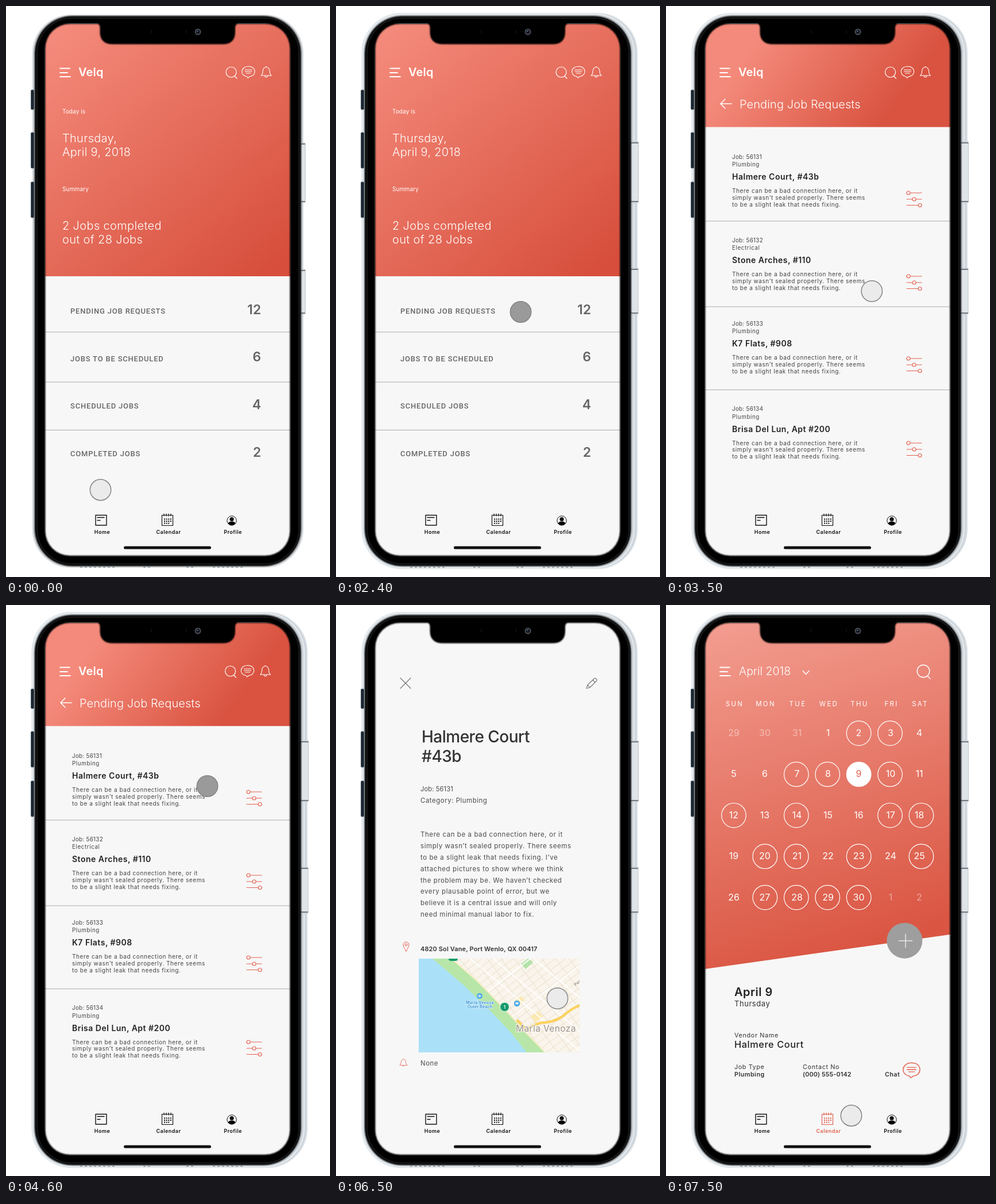
Animation of 564x993 px, one loop 9.5 s. Source, as an HTML page:

```html
<!DOCTYPE html>
<html lang="en">
<head>
<meta charset="utf-8">
<title>Job manager walkthrough</title>
<style>
  html, body { margin: 0; width: 100%; height: 100%; overflow: hidden; background: #fff; }
  svg { display: block; }
  #stage { width: 100%; height: 100%; font-family: Inter, sans-serif; }
  .caps { font-family: Roboto, sans-serif; font-weight: 500; }
  .light { font-weight: 300; }
  .medium { font-weight: 500; }
  .bold { font-weight: 600; }
  .mid { text-anchor: middle; }
  .line { fill: none; stroke: currentColor; stroke-linecap: round; stroke-linejoin: round; }
  .page { display: none; }
</style>
</head>
<body>
<svg id="stage" viewBox="0 0 564 993"></svg>
<script>
const LOOP = 9500;
const BRAND = 'Velq', SITE = 'Halmere Court', TOWN = 'Marla Venoza';

const text = (x, y, size, str, spacing = 0, cls = '', fill = 'currentColor', extra = '') =>
  `<text x="${x}" y="${y}" font-size="${size}" letter-spacing="${spacing}" class="${cls}" fill="${fill}" ${extra}>${str}</text>`;
const path = (d, width = 1.2, extra = '') => `<path class="line" d="${d}" stroke-width="${width}" ${extra}/>`;
const at = (x, y, body, color = 'inherit', scale = 1) =>
  `<g transform="translate(${x} ${y}) scale(${scale})" style="color:${color}">${body}</g>`;
const rect = (x, y, w, h, fill, r = 0, extra = '') =>
  `<rect x="${x}" y="${y}" width="${w}" height="${h}" rx="${r}" fill="${fill}" ${extra}/>`;
const circle = (x, y, r, fill = 'none', extra = '') =>
  `<circle cx="${x}" cy="${y}" r="${r}" fill="${fill}" ${extra}/>`;
const gradient = (id, x1, y1, x2, y2, from, to) =>
  `<linearGradient id="${id}" gradientUnits="userSpaceOnUse" x1="${x1}" y1="${y1}" x2="${x2}" y2="${y2}">
    <stop stop-color="${from}"/><stop offset="1" stop-color="${to}"/></linearGradient>`;
const roundBox = (x, y, w, h, r) => `M${x + r} ${y}h${w - 2 * r}a${r} ${r} 0 0 1 ${r} ${r}v${h - 2 * r}a${r} ${r} 0 0 1 ${-r} ${r}` +
  `h${2 * r - w}a${r} ${r} 0 0 1 ${-r} ${-r}v${2 * r - h}a${r} ${r} 0 0 1 ${r} ${-r}z`;
const rule = y => rect(68, y, 427, 1, '#acacac');

// Icons, each centred on its own zero point
const menu = path('M94 108.5h17M94 116h13M94 123h18', 1.8);
const search = path('M9 0a9 9 0 1 1-18 0a9 9 0 1 1 18 0M6 7l4 4');
const chat = path('M-3 8.5C-15 7-14-9 0-9C15-9 14 8 2 8.7L-1 11zM-6-3H6M-6 0H6M-4 3H4', 1.1);
const bell = path('M-9 6Q-6 4-6-2Q-5-8-1-8.5Q0-11 1-8.5Q5-8 6-2Q6 4 9 6zM-2.5 7Q0 11 2.5 7', 1.1);
const pin = path('M0 8Q-5 0-5-3A5 5 0 0 1 5-3Q5 0 0 8zM2-3a2 2 0 1 1-4 0a2 2 0 1 1 4 0', 1);
const pencil = path('M-9 9L-7 3L4.500-8Q6-9.500 8-7.500Q10-5.500 8.500-4L-3 7.500zM-7 3L-3 7.500M2-5.500L6-1.500', 1.1);
const sliders = [[-10, -11], [0, 0], [10, 10.5]].map(([knob, y]) =>
  path(`M-13 ${y}H13`, 1.1) + circle(knob, y, 3, '#f7f7f7', 'stroke="currentColor" stroke-width="1.1"')).join('');
const topIcons = dx => at(392 + dx, 115, search) + at(422 + dx, 114, chat) + at(453 + dx, 115, bell);
const appBar = dx => menu + text(126, 122, 20, BRAND, .2, 'bold') + topIcons(dx);

function nav(calendarColor = '#111') {
  let dots = '';
  for (let i = 0; i < 11; i++) dots += rect(-6 + i % 4 * 3.6, -2.6 + Math.floor(i / 4) * 3.6, 2, 2, 'currentColor');
  const calendar = path('M-9.5-8.5h19v18h-19zM-6-11v4M-2-11v4M2-11v4M6-11v4', 1.2) + dots;
  return `<g style="color:#111">
    ${path('M156 885.5h19v17.5h-19zM159 889.5h12M159 894.5h5', 1.4)}
    ${text(167.5, 918, 9, 'Home', .5, 'mid bold')}
    ${at(281, 894, calendar + text(2, 24, 9, 'Calendar', .45, 'mid bold'), calendarColor)}
    ${circle(393, 895, 8.2, 'none', 'stroke="#111"')}${circle(393, 892.5, 3.6, '#111')}
    <path d="M386.5 900Q388 896 393 896.5Q398 896 399.5 900Q393 906 386.5 900"/>
    ${text(395, 918, 9, 'Profile', .5, 'mid bold')}
    ${rect(205, 939.5, 152, 5, '#111', 2.5)}</g>`;
}

function homePage() {
  const rows = [['PENDING JOB REQUESTS', 12], ['JOBS TO BE SCHEDULED', 6], ['SCHEDULED JOBS', 4], ['COMPLETED JOBS', 2]];
  return rect(68, 31, 427, 439, 'url(#homeFill)') + `<g style="color:#fff">` + appBar(0) +
    text(98, 187, 10, 'Today is', .1) +
    text(98, 237, 20, 'Thursday,', .3, 'light') + text(98, 261, 20, 'April 9, 2018', .3, 'light') +
    text(98, 322, 10, 'Summary', .15) +
    text(98, 388.5, 20, '2 Jobs completed', .35, 'light') + text(98, 412.5, 20, 'out of 28 Jobs', .35, 'light') + '</g>' +
    rows.map(([label, count], i) => text(112, 535 + i * 82.7, 13, label, .8, 'caps', '#666') +
      text(444, 535.5 + i * 82.7, 23, count, 0, 'bold', '#666', 'text-anchor="end"')).join('') +
    [566.5, 653.5, 737].map(rule).join('') + nav();
}

function listPage() {
  // Text offset, slider height, category, title
  const jobs = [[0, 336, 'Plumbing', SITE + ', #43b'], [145, 481, 'Electrical', 'Stone Arches, #110'],
    [290, 624, 'Plumbing', 'K7 Flats, #908'], [438.5, 771, 'Plumbing', 'Brisa Del Lun, Apt #200']];
  const note = ['There can be a bad connection here, or it', 'simply wasn’t sealed properly. There seems', 'to be a slight leak that needs fixing.'];
  return rect(68, 31, 427, 179.5, 'url(#listFill)') + `<g style="color:#fff">` + appBar(-1.5) +
    path('M114 170H95M103 162l-8 8l8 8', 1.6) + text(128, 178, 20, 'Pending Job Requests', .1, 'light') + '</g>' +
    jobs.map(([y, sliderY, kind, title], i) => at(0, y,
      text(115, 265.5, 9.8, 'Job: 5613' + (i + 1), .3) + text(115, 279, 9.8, kind, .6) +
      text(115, 302, 14, title, .5, 'bold', '#222') +
      note.map((s, n) => text(115, 325.3 + n * 11.6, 10, s, .58)).join(''), '#444') +
      at(432, sliderY, sliders, '#e4604f')).join('') +
    [373.5, 522.5, 667].map(rule).join('') + nav();
}

function map() {
  const coastRoad = 'M57 0L101 38L152 90L186 128L220 163';
  const highway = 'M172 108L188 124Q205 110 222 111Q244 108 258 94Q270 85 282 81';
  return `<svg x="144" y="615" width="280" height="163">
    <defs><pattern id="blocks" width="19" height="11" patternUnits="userSpaceOnUse" patternTransform="rotate(-37)">
      <rect width="19" height="11" fill="#ece3d3"/><rect x=".7" y=".7" width="17.8" height="9.8" fill="#faf5ec"/></pattern></defs>
    ${rect(0, 0, 280, 163, 'url(#blocks)')}
    <path d="M178 9l13-10l8 8l-13 11z" fill="#b4e2a8"/>
    <path d="M194 100l14-9l9 10l-14 10zM168 72l11-7l6 7l-10 7z" fill="#fbe9b4"/>
    ${path('M90 0L280 160M130 0L280 126M200 0L280 68M110 65L205-8M160 102L280 12', 1.8, 'style="stroke:#fff"')}
    <path d="${coastRoad}H0V0z" fill="#b7e6a8"/>
    <path d="M0 0H24L78 46L122 88L160 128L188 163H0z" fill="#abe1f8"/>
    ${path(coastRoad, 2, 'style="stroke:#fbedc5"')}
    ${path(highway, 4, 'style="stroke:#f1bf3d"')}${path(highway, 2.4, 'style="stroke:#ffd966"')}
    ${rect(52, -5, 16, 9, '#179c6d', 4)}
    ${circle(149.5, 84, 8, '#179c6d', 'stroke="#fff" stroke-width="1"')}${text(149.5, 87, 8, 1, 0, 'mid bold', '#fff')}
    ${circle(106, 65, 5, '#4aa8e8')}${path('M103.5 65q2.5-4 5 0zM106 64v4', .9, 'style="stroke:#fff"')}
    ${circle(171, 78, 5.2, '#4aa8e8')}${rect(168.5, 76, 5, 3.5, '#fff', 1)}
    <g stroke="#e4f6fd" stroke-width="1.5" paint-order="stroke">
      ${text(106.5, 78.5, 7, TOWN, .2, 'mid bold', '#2e8bd0')}${text(106.5, 86, 7, 'Outer Beach', .1, 'mid bold', '#2e8bd0')}</g>
    ${text(169, 127, 15.5, TOWN, .4, '', '#99948f', 'stroke="#fcf8f0" stroke-width="2" paint-order="stroke"')}
    ${text(273, 48, 7, 'Per', .3, '', '#777', 'transform="rotate(-38 273 48)"')}
  </svg>`;
}

function detailPage() {
  const lines = ['There can be a bad connection here, or it', 'simply wasn’t sealed properly. There seems',
    'to be a slight leak that needs fixing. I’ve', 'attached pictures to show where we think',
    'the problem may be. We haven’t checked', 'every plausable point of error, but we',
    'believe it is a central issue and will only', 'need minimal manual labor to fix.'];
  return `<g style="color:#4c4c4c">` + path('M112 127l18 18M130 127l-18 18', 1.3, 'style="stroke:#777"') +
    at(445, 136, pencil, '#777') +
    text(149, 239, 28, SITE, -.5, 'medium', '#333') + text(149, 273, 28, '#43b', -.5, 'medium', '#333') +
    text(147, 324, 11.2, 'Job: 56131', .1) + text(147, 343.7, 11.5, 'Category: Plumbing', .5) +
    lines.map((s, i) => text(147, 403.2 + i * 19.85, 11.5, s, .57)).join('') +
    at(122, 594, pin, '#e4604f') +
    text(147, 601.7, 11, '4820 Sol Vane, Port Wenlo, QX 00417', .12, 'bold', '#333') + map() +
    at(117.5, 796, bell, '#e4604f', .7) + text(147, 800.6, 11.5, 'None', .5) + '</g>' + nav();
}

function calendarPage() {
  const columns = [118, 172, 228, 282, 335.5, 391, 441];
  const names = ['SUN', 'MON', 'TUE', 'WED', 'THU', 'FRI', 'SAT'];
  const busy = [2, 3, 7, 8, 10, 12, 14, 17, 18, 20, 21, 23, 25, 27, 28, 29, 30];
  let days = '';
  for (let i = 0; i < 35; i++) {
    const n = i - 2, inMonth = n > 0 && n <= 30, x = columns[i % 7], y = 222.5 + Math.floor(i / 7) * 71.4;
    const ringX = 118 + i % 7 * 54.4, today = n === 9;
    if (today || busy.includes(n)) days += circle(ringX, y + .5, 21.3, today ? '#fff' : 'none', 'stroke="#fff" stroke-width="1.2"');
    days += text(x, y + 5.5, 16, n <= 0 ? n + 31 : n > 30 ? n - 30 : n, 0, 'mid', today ? '#e0604f' : '#fff', `opacity="${inMonth ? 1 : .45}"`);
  }
  return `<path d="M68 31H495V573L68 633z" fill="url(#calendarFill)"/><g style="color:#fff">` + menu +
    text(127, 122, 19.5, 'April 2018', 0, 'light') + path('M238 114.5l5.5 6l5.5-6', 1.5) + at(448, 115, search, '#fff', 1.2) +
    names.map((s, i) => text(columns[i] + 1.5, 176, 11.5, s, 2.3, 'mid')).join('') + days + '</g>' +
    circle(415.3, 583.7, 31, '#9e9e9e') + path('M405.5 584h23M417 572.5v23', 1.5, 'style="stroke:#e8e8e8"') +
    `<g style="color:#333">` + text(119, 679.5, 20, 'April 9', .5, 'bold', '#222') + text(119, 697.5, 13, 'Thursday', .55) +
    text(119, 752, 10.8, 'Vendor Name', .65) + text(119, 770.3, 16.3, SITE, .6, 'medium', '#222') +
    text(119, 807, 10.8, 'Job Type', .6) + text(119, 820.3, 10.8, 'Plumbing', .45, 'bold') +
    text(238, 807, 10.8, 'Contact No', .65) + text(238, 820.3, 10.8, '(000) 555-0142', .15, 'bold') +
    text(381, 820.3, 10.8, 'Chat', .4, 'bold') + at(427.5, 808, chat, '#e4604f', 1.3) + '</g>' + nav('#e0604f');
}

function casing() {
  const leftKey = (y, h) => rect(43.5, y, 5, h, '#1c2731', 1.5, 'stroke="#415261" stroke-width=".8"');
  const rightKey = (y, h, reach) => rect(514, y, reach, h, '#dfe4e8', 1.5, 'stroke="#b4bcc2" stroke-width=".8"') +
    path(`M514 ${y + 2}h${reach - 1}M514 ${y + h - 2}h${reach - 1}`, 2, 'style="stroke:#737b82"');
  return rect(46, 15.5, 471.5, 961, '#cccfd2', 67, 'stroke="#e8eaec" stroke-width="1.5"') + rightKey(238, 104, 7) + rightKey(458, 78, 7) +
    `<g id="rim">${rect(45, 12.5, 479.5, 966, '#cfd6dc', 69, 'stroke="#e6ebee" stroke-width="1.5"')}
      ${rect(47, 14.5, 472, 962, 'none', 67, 'stroke="#eef2f4" stroke-width="1.5"')}
      ${rightKey(236, 106, 12.5)}${rightKey(456, 80, 12)}</g>` +
    leftKey(146, 34) + leftKey(220, 62) + leftKey(306, 62) +
    path('M130 976h58M240 976h10M315 976h12M361 976h50', 2, 'stroke-dasharray="2 6" style="stroke:#9da3a8"');
}

// Soft-edged black frame with notch, laid over the screen
function bezel() {
  return `<g filter="url(#soft)">
    <path d="${roundBox(50, 17.5, 463.5, 956.5, 65)}${roundBox(68.3, 31, 426, 925, 43)}" fill="#050505" fill-rule="evenodd" stroke="#0005" stroke-width="1"/>
    <path d="M157 30Q163.5 31 163.5 38V46Q164 66.5 186 66.5H377Q398.5 66.5 399 46V38Q399 31 406 30z" fill="#050505"/></g>` +
    path(roundBox(54, 21, 456, 949.5, 61), 2, 'style="stroke:#1b1b1c"') +
    circle(334, 45, 5.5, '#4c5058') + circle(334, 45, 3.6, '#11141c') + circle(333.3, 44, 1.2, '#5d6a88') +
    path('M253 42v5M314 42v5', 1, 'style="stroke:#1e1e1e"');
}

const stage = document.getElementById('stage');
stage.innerHTML = `<defs>
  ${gradient('homeFill', 90, 45, 450, 460, '#f48a7b', '#d74f3c')}
  ${gradient('listFill', 165, 50, 375, 205, '#f48a7b', '#d95340')}
  ${gradient('calendarFill', 170, 20, 350, 590, '#f29b8e', '#da5643')}
  <filter id="soft"><feGaussianBlur stdDeviation=".8"/></filter>
  <clipPath id="screen">${rect(66, 29, 431, 929, '#000', 44)}</clipPath></defs>
  ${casing()}<g clip-path="url(#screen)">${rect(60, 25, 440, 940, '#f7f7f7')}
  ${[homePage, listPage, detailPage, calendarPage].map(page => `<g class="page">${page()}</g>`).join('')}</g>
  ${bezel()}<circle id="cursor" r="18.2" stroke="#858585" stroke-width="1.5"/>`;

const pages = [...stage.querySelectorAll('.page')];
const rim = document.getElementById('rim'), cursor = document.getElementById('cursor');
const clamp = v => Math.min(1, Math.max(0, v));
const curve = (p, a, b, c) => (1 - p) ** 2 * a + 2 * p * (1 - p) * b + p * p * c;

// Pointer position after each 100 ms tick; the second move rests for one tick halfway
function pointer(tick) {
  if (tick < 35) { const p = clamp((tick - 9) / 10); return [curve(p, 164.5, 243, 321.5), curve(p, 841.5, 686.5, 532)]; }
  if (tick < 57) { const p = clamp((tick - (tick < 38 ? 34 : 35)) / 6); return [curve(p, 321.5, 451, 350.5), curve(p, 532, 423.5, 315)]; }
  const p = clamp((tick - 56) / 13);
  return [curve(p, 350.5, 464, 322.5), curve(p, 315, 537, 888)];
}

function draw() {
  const t = performance.now() % LOOP, tick = Math.floor(t / 100);
  const current = [25, 47, 75].filter(change => tick >= change).length;
  pages.forEach((page, i) => page.style.display = i === current ? 'inline' : 'none');
  rim.style.display = tick >= 10 ? 'inline' : 'none';
  const [x, y] = pointer(tick);
  cursor.setAttribute('cx', x);
  cursor.setAttribute('cy', y);
  cursor.setAttribute('fill', [24, 46, 74].includes(tick) ? '#9a9a9a' : '#ebebeb');
  requestAnimationFrame(draw);
}
draw();
</script>
</body>
</html>
```
